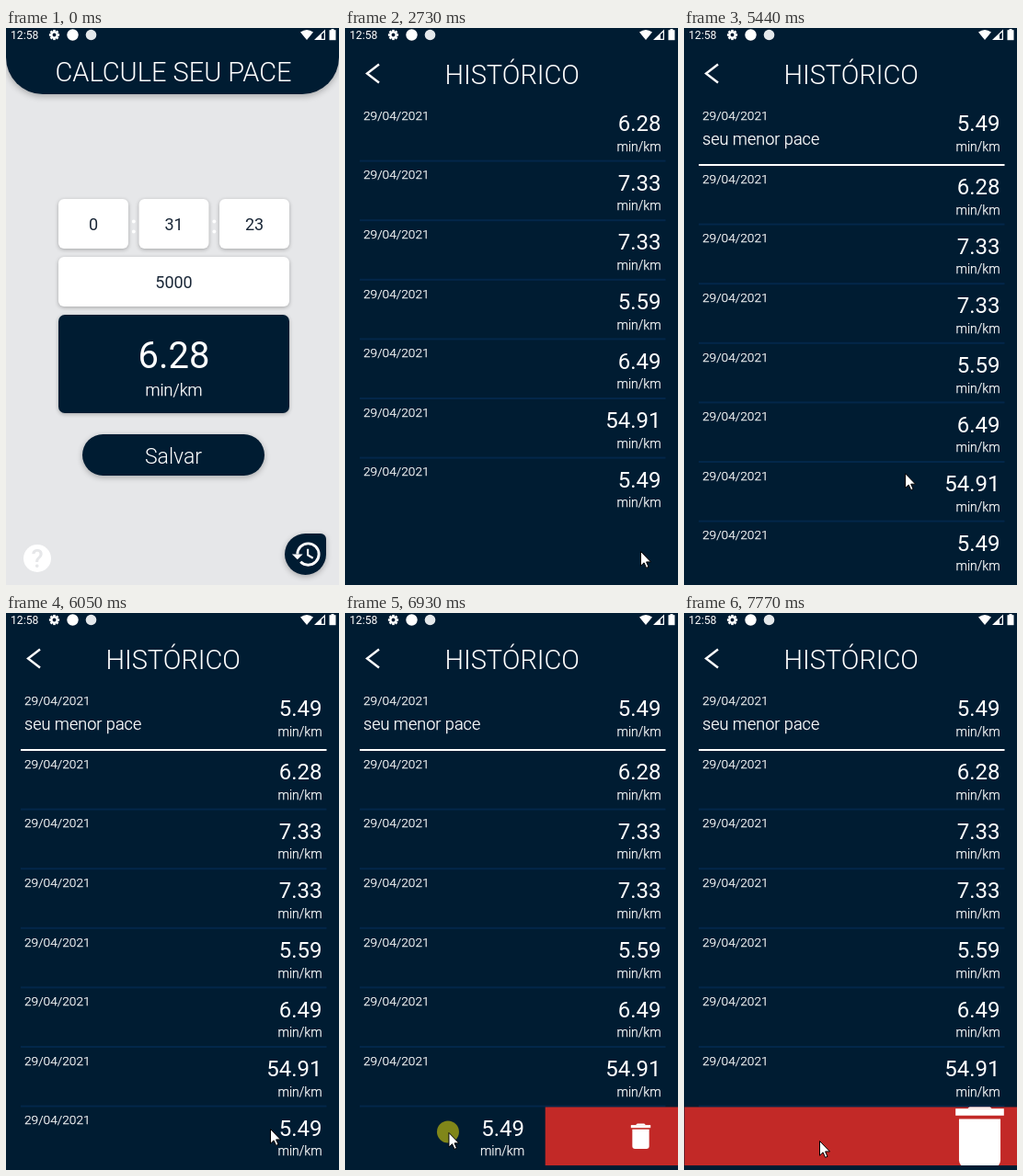
Animation of 362x606 px, one loop 8 s. Source, as an HTML page with a canvas:

```html
<!DOCTYPE html>
<html lang="pt">
<head>
<meta charset="utf-8">
<title>Pace</title>
<style>
html, body { margin: 0; width: 100%; height: 100%; overflow: hidden; background: #e6e7e9; }
canvas { display: block; width: 362px; height: 606px; }
</style>
</head>
<body>
<canvas id="stage" width="362" height="606"></canvas>
<script>
const ctx = document.getElementById('stage').getContext('2d');
const W = 362, H = 606, LOOP = 8000;
const NAVY = '#001c32', PAPER = '#e6e7e9', RULE = '#03274a', RED = '#c22927';
const ROW = 64.6, RIGHT = 343.6;
const PACES = ['6.28', '7.33', '7.33', '5.59', '6.49', '54.91', '5.49'];
const OPEN = 2730, BEST = 3090, PRESS = 6150, RELEASE = 7110;

// Pointer moves, each eased from wherever the last one ended
const MOVES = [
  { at: 1150, ms: 230, x: 319, y: 576 },
  { at: 1570, ms: 140, x: 321, y: 569 },
  { at: 3040, ms: 150, x: 263, y: 475 },
  { at: 3330, ms: 320, x: 251, y: 455 },
  { at: 5270, ms: 230, x: 238, y: 490 },
  { at: 5500, ms: 350, x: 276, y: 576 },
  { at: 5850, ms: 200, x: 287, y: 561 },
  { at: PRESS, ms: 1000, x: 88, y: 565.5 },
  { at: 7200, ms: 570, x: 147, y: 574 }
];

const clamp = k => Math.min(1, Math.max(0, k));
const ease = k => k * k * (3 - 2 * k);

function pointerAt(t) {
  let x = 319, y = 612;
  for (const m of MOVES) {
    const k = ease(clamp((t - m.at) / m.ms));
    x += (m.x - x) * k;
    y += (m.y - y) * k;
  }
  return { x, y };
}

// The row follows the pointer, then springs fully open
function swipeAt(t) {
  if (t < PRESS) return 0;
  const dragged = Math.max(0, 261 - pointerAt(Math.min(t, RELEASE)).x);
  return t < RELEASE ? dragged : 366 - (366 - dragged) * Math.exp((RELEASE - t) / 100);
}

function text(str, x, y, size, weight = 300, align = 'left', color = '#fff') {
  ctx.font = `${weight} ${size}px Roboto, sans-serif`;
  ctx.textAlign = align;
  ctx.fillStyle = ctx.strokeStyle = color;
  ctx.fillText(str, x, y);
  // Keeps small light text crisp
  if (weight === 300 && size < 20) {
    ctx.lineWidth = 0.25;
    ctx.strokeText(str, x, y);
  }
}

function rect(x, y, w, h, color) {
  ctx.fillStyle = color;
  ctx.fillRect(x, y, w, h);
}

function box(x, y, w, h, radius, color, blur = 4) {
  ctx.save();
  ctx.shadowColor = 'rgba(0,0,0,.28)';
  ctx.shadowBlur = blur;
  ctx.shadowOffsetY = blur / 3;
  ctx.fillStyle = color;
  ctx.beginPath();
  ctx.roundRect(x, y, w, h, radius);
  ctx.fill();
  ctx.restore();
}

function disc(x, y, r, color) {
  ctx.fillStyle = color;
  ctx.beginPath();
  ctx.arc(x, y, r, 0, Math.PI * 2);
  ctx.fill();
}

function trace(points) {
  ctx.beginPath();
  points.forEach(p => ctx.lineTo(...p));
}

function fill(points, color = '#fff') {
  trace(points);
  ctx.closePath();
  ctx.fillStyle = color;
  ctx.fill();
}

function line(points, width, color = '#fff') {
  trace(points);
  ctx.lineWidth = width;
  ctx.strokeStyle = color;
  ctx.stroke();
}

// Runs paint on a 24-unit grid centred at cx, cy
function icon(paint, cx, cy, size) {
  ctx.save();
  ctx.translate(cx, cy);
  ctx.scale(size / 24, size / 24);
  ctx.translate(-12, -12);
  paint();
  ctx.restore();
}

function clock() {
  ctx.beginPath();
  ctx.arc(13, 12, 8, Math.PI, Math.PI * 2.75);
  ctx.lineWidth = 2;
  ctx.strokeStyle = '#fff';
  ctx.stroke();
  fill([[1, 12], [9, 12], [5, 16]]);
  line([[12.75, 8], [12.75, 12.6], [16.6, 14.9]], 1.5);
}

function trash() {
  fill([[9.5, 3], [14.5, 3], [15.5, 4], [8.5, 4]]);
  rect(5, 4, 14, 2, '#fff');
  ctx.beginPath();
  ctx.roundRect(6, 7, 12, 14, [0, 0, 2, 2]);
  ctx.fill();
}

function gear(x, y) {
  for (let i = 0; i < 8; i++) {
    ctx.save();
    ctx.translate(x, y);
    ctx.rotate(i * Math.PI / 4);
    rect(-1.3, -5.6, 2.6, 3, '#fff');
    ctx.restore();
  }
  disc(x, y, 4.3, '#fff');
  disc(x, y, 1.9, NAVY);
}

function statusBar() {
  text('12:58', 5, 12, 12.2, 400);
  gear(52.5, 7.5);
  disc(72.5, 7.5, 6.2, '#fff');
  disc(92.5, 7.5, 5.8, '#e4e8eb');
  ctx.fillStyle = '#fff';
  ctx.beginPath();
  ctx.moveTo(327, 13);
  ctx.lineTo(320, 4.5);
  ctx.quadraticCurveTo(327, -0.5, 334, 4.5);
  ctx.fill();
  fill([[335, 13], [347, 13], [347, 1.5]]);
  fill([[343, 11.8], [345.8, 11.8], [345.8, 4.4], [343, 7]], NAVY);
  rect(353.5, 1, 3, 2, '#fff');
  rect(351.5, 2.2, 7, 11, '#fff');
}

function field(value, x, y, w) {
  box(x, y, w, 54, 6, '#fff');
  text(value, x + w / 2, y + 33.7, 18, 400, 'center', '#1b2838');
}

function calculator() {
  rect(0, 0, W, H, PAPER);
  box(0, -20, W, 92, [0, 0, 40, 40], NAVY, 7);
  text('CALCULE SEU PACE', 182, 57.5, 29, 300, 'center');

  ['0', '31', '23'].forEach((value, i) => {
    const x = 57 + i * 87.5;
    field(value, x, 186, 76);
    if (i) [210.5, 221.5].forEach(y => disc(x - 5.7, y, 1.9, '#fff'));
  });
  field('5000', 57, 249, 251);

  box(57, 312, 251, 107, 7, NAVY);
  text('6.28', 182.5, 369.5, 40, 400, 'center');
  text('min/km', 182.5, 400, 18, 300, 'center');

  box(83, 442, 198, 45, 22.5, NAVY, 6);
  text('Salvar', 182, 473.5, 23, 300, 'center');

  disc(34, 577, 15, '#fff');
  text('?', 34, 586.5, 27, 500, 'center', PAPER);
  box(303, 550, 45, 45, [22.5, 6, 22.5, 22.5], NAVY, 6);
  icon(clock, 327, 572.5, 35);
}

function row(y, pace, dx = 0) {
  text('29/04/2021', 20 + dx, y + 99.8, 13.7);
  text(pace, RIGHT + dx, y + 112.2, 24, 400, 'right');
  text('min/km', RIGHT + dx, y + 133.8, 14, 300, 'right');
}

function history(best, swipe) {
  rect(0, 0, W, H, NAVY);
  line([[37, 39.5], [24, 49.5], [37, 59.5]], 2.4);
  text('HISTÓRICO', 181.7, 60.5, 29, 300, 'center');

  const top = best ? 69 : 0;
  if (best) {
    row(0, '5.49');
    text('seu menor pace', 20, 127, 18.1);
    rect(16, 148, 332.5, 2, '#fff');
  }
  PACES.forEach((pace, i) => {
    const last = i === PACES.length - 1;
    const y = top + i * ROW;
    row(y, pace, last ? -swipe : 0);
    if (!last) rect(16, y + 143.6, 332.5, 2, RULE);
  });
  if (swipe > 0) trashPanel(Math.max(0, 366 - swipe), swipe / 146);
}

function trashPanel(x, scale) {
  ctx.save();
  ctx.beginPath();
  ctx.rect(x, 537.5, W, 63.5);
  ctx.clip();
  rect(x, 537, W, 65, RED);
  icon(trash, 321.5, 569.3, 36 * scale);
  ctx.restore();
}

function pointer(t) {
  const { x, y } = pointerAt(t);
  const pressed = (t >= 1940 && t < 2020) || (t >= PRESS && t < RELEASE);
  if (pressed) disc(x - 0.5, y - 0.5, 12, 'rgba(255,240,0,.5)');
  const shape = [[0.5, 0.5], [0.5, 16.2], [4.1, 12.8], [6.6, 18.4], [9, 17.3], [6.6, 11.9], [11.5, 11.9], [0.5, 0.5]]
    .map(p => [p[0] + x, p[1] + y]);
  fill(shape);
  line(shape, 1, '#000');
}

function draw(t) {
  if (t < OPEN) calculator();
  else history(t >= BEST, swipeAt(t));
  statusBar();
  pointer(t);
}

const start = performance.now();
function tick() {
  draw((performance.now() - start) % LOOP);
  requestAnimationFrame(tick);
}
tick();
</script>
</body>
</html>
```
